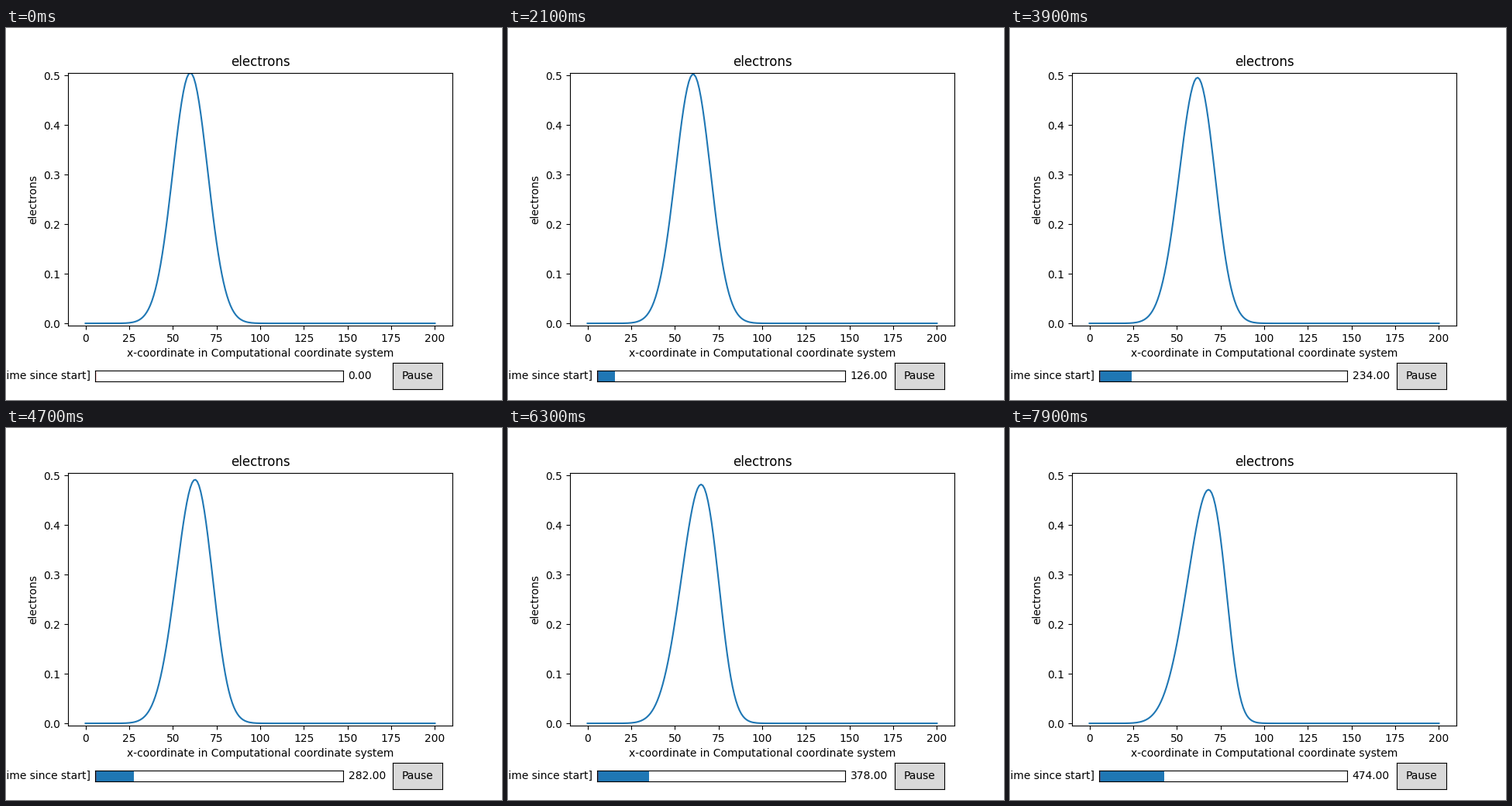
Recreate the animation shown at these times as a matplotlib script. Size 640 by 480 pixels, loop 8000 ms.

```python
import numpy as np
import matplotlib.pyplot as plt
from matplotlib.animation import FuncAnimation
from matplotlib.patches import Rectangle

FRAMES, INTERVAL = 80, 100
TIME_STEP, TIME_MAX = 6, 1800
PEAK, CENTER, SIGMA = 0.505, 60, 10

grid = np.arange(201)
start = np.linspace(-20, 220, 2401)
density = PEAK * np.exp(-(start - CENTER) ** 2 / (2 * SIGMA ** 2))


def profile(time):
    """Density after each parcel is pushed right, keeping total mass."""
    push = 6.4 * (time / 474) ** 2.1 * np.exp(-(start - 64.6) ** 2 / (2 * 18 ** 2))
    stretch = 1 - push * (start - 64.6) / 18 ** 2
    return np.interp(grid, start + push, density / stretch)


def panel(rect, color):
    ax = fig.add_axes(rect, facecolor=color)
    ax.set(xticks=[], yticks=[], xlim=(0, 1), ylim=(0, 1))
    return ax


fig, ax = plt.subplots(figsize=(6.4, 4.8), dpi=100)
fig.subplots_adjust(left=0.125, right=0.9, bottom=0.2, top=0.88)
line, = ax.plot(grid, profile(0), color="#1f77b4", lw=1.5)
ax.set(title="electrons", ylabel="electrons",
       xlabel="x-coordinate in Computational coordinate system",
       xlim=(-10, 210), ylim=(-0.0045, 0.5055))

slider = panel([0.18, 0.05, 0.5, 0.03], "white")
slider.set_xlim(0, TIME_MAX)
bar = slider.add_patch(Rectangle((0, 0), 0, 1, color="#1f77b4", lw=0))
slider.axvline(0, color="red", lw=1)
slider.text(-0.02, 0.5, "time since start]", ha="right", va="center",
            transform=slider.transAxes)
value = slider.text(1.02, 0.5, "0.00", ha="left", va="center",
                    transform=slider.transAxes)

button = panel([0.78, 0.03, 0.1, 0.07], "0.85")
button.text(0.5, 0.5, "Pause", ha="center", va="center")


def update(frame):
    time = TIME_STEP * frame
    line.set_ydata(profile(time))
    bar.set_width(time)
    value.set_text(f"{time:.2f}")
    return line, bar, value


anim = FuncAnimation(fig, update, frames=FRAMES, interval=INTERVAL,
                     repeat=True, repeat_delay=0)
plt.show()
```
